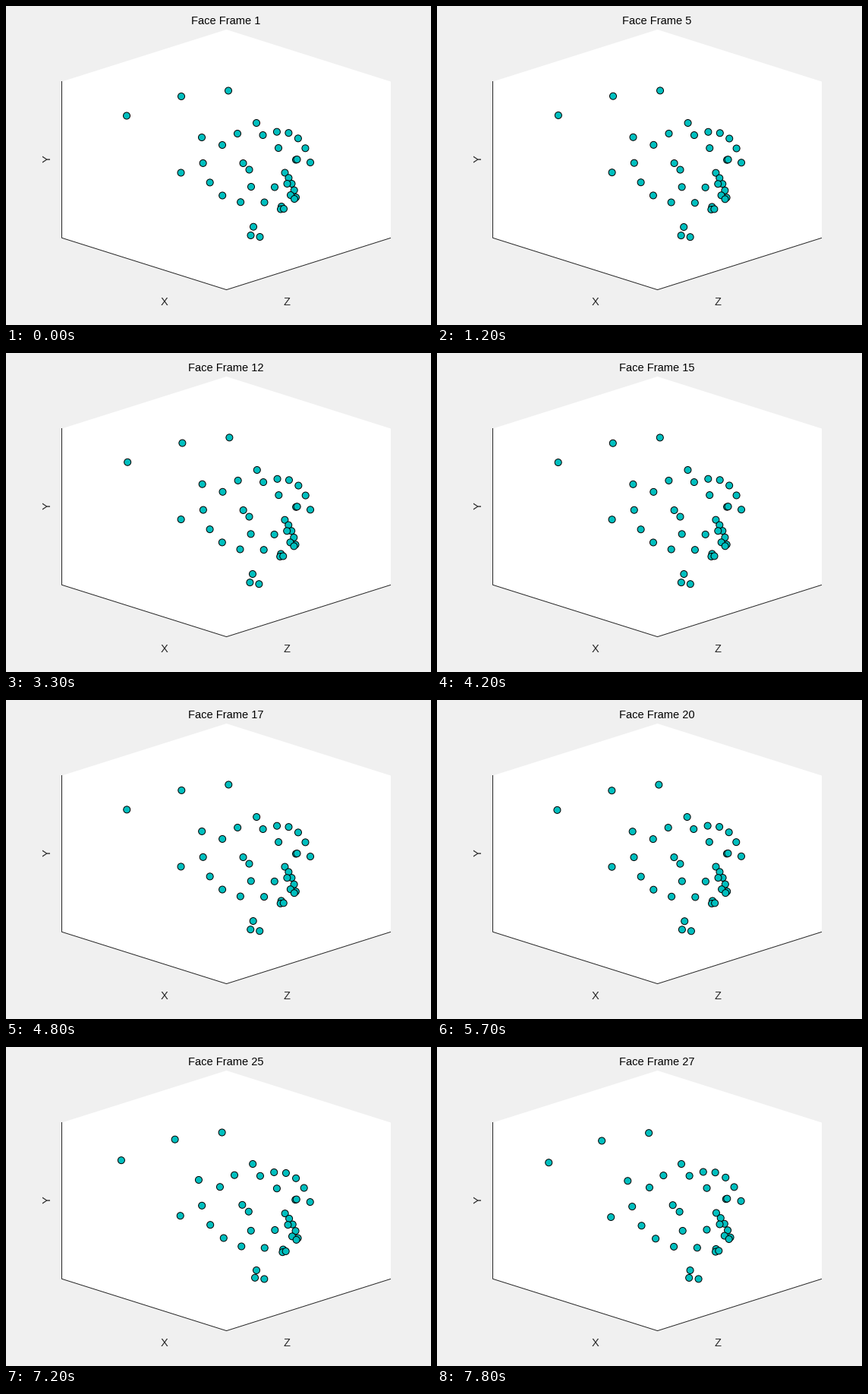
A matplotlib script that plays this animation: 560 px wide and 420 px high, repeating every 8 s.

```python
import math

import matplotlib.pyplot as plt
import numpy as np
from matplotlib.animation import FuncAnimation

WIDTH, HEIGHT, DPI = 560, 420, 100
PX = 72 / DPI  # points per pixel
TICK_MS, TICKS, TICKS_PER_POSE, POSES = 100, 80, 3, 27
TURN_START, JAW_OPEN = 18, 23  # poses where the turn starts and the jaw is open
INK = "#262626"


def curve(count, start, middle, end):
    """Evenly spaced samples of the parabola through three points."""
    t = np.linspace(0, 1, count)[:, None]
    return (np.array(start) * (1 - t) * (1 - 2 * t)
            + np.array(middle) * 4 * t * (1 - t)
            + np.array(end) * t * (2 * t - 1))


# The resting face, feature by feature, in pixels from the top left.
HOME = np.vstack([
    curve(3, (159, 144.5), (231, 119), (293, 111.5)),    # forehead
    curve(3, (330, 154), (305, 168), (285, 183)),        # left brow
    curve(6, (338.5, 170), (379, 170), (401, 206)),      # right brow
    curve(6, (258, 173), (276, 242), (340.5, 258.5)),    # cheek outline
    curve(3, (359, 187), (382, 202.5), (383.5, 202)),    # nose bridge
    curve(3, (312.5, 207), (320.5, 215.5), (323, 238)),  # inner cheek
    curve(2, (230.5, 219.5), (292, 229), (354, 238.5)),  # ear, mouth corner
    curve(5, (367.5, 219.5), (376.5, 234), (382, 252)),  # nose to lip
    curve(3, (370.5, 234), (375, 249), (380, 254)),      # upper lip
    curve(3, (363, 264), (362, 267.5), (366, 267)),      # lower lip
    curve(3, (326, 290.7), (322.5, 302), (334.5, 304)),  # chin
])

# A full head turn is a linear map around the middle of the face.
TURN = (HOME - (330, 218)) @ np.array([[.015, -.045], [.125, 0]])

# The open jaw pulls the skin down around one spot, fading with distance.
jaw_distance = np.hypot(*(HOME - (335, 262)).T)
JAW = np.exp(-(jaw_distance / 25) ** 2 / 2)[:, None] * (-3, 6.5)


def marker_positions(pose):
    if pose < TURN_START:
        turn = -.11 * math.sin(math.pi * (pose - 1) / (TURN_START - 1))
        jaw = .1 * min(1, (pose - 1) / 4)
    else:
        since = pose - TURN_START
        turn = (since / (POSES - TURN_START)) ** 2
        jaw = max(.1, min(1, since / (JAW_OPEN - TURN_START)) ** 2)
    return HOME + turn * TURN + jaw * JAW


def label(x, y, text, color=INK, **style):
    return ax.text(x, y, text, color=color, family="Liberation Sans",
                   fontsize=14.67 * PX, ha="center", **style)


fig = plt.figure(figsize=(WIDTH / 100, HEIGHT / 100), dpi=DPI,
                 facecolor="#f0f0f0")
ax = fig.add_axes([0, 0, 1, 1])
ax.set(xlim=(0, WIDTH), ylim=(HEIGHT, 0))
ax.axis("off")

left, middle, right = 73.5, 290.5, 507
ax.fill([left, middle, right, right, middle, left],
        [99.5, 31, 99.5, 305.5, 374, 305.5], color="white", lw=0)
ax.plot([left, left, middle, right], [99, 305.3, 373.6, 305.3], color=INK,
        lw=PX, solid_capstyle="butt", snap=False)

label(209, 394, "X", va="baseline")
label(370.5, 394, "Z", va="baseline")
label(55, 201.5, "Y", va="center", rotation=90)
title = label(290, 24, "", color="black", va="baseline")

# One size per dot keeps the dots off the whole-pixel grid.
dots = ax.scatter(*HOME.T, s=np.full(len(HOME), (9 * PX) ** 2),
                  facecolor=(0, .75, .75), edgecolor="black", linewidth=PX,
                  snap=False, zorder=3)


def update(tick):
    pose = min(tick // TICKS_PER_POSE + 1, POSES)
    title.set_text(f"Face Frame {pose}")
    dots.set_offsets(marker_positions(pose))
    return title, dots


anim = FuncAnimation(fig, update, frames=TICKS, interval=TICK_MS,
                     repeat=True, repeat_delay=0)
plt.show()
```
